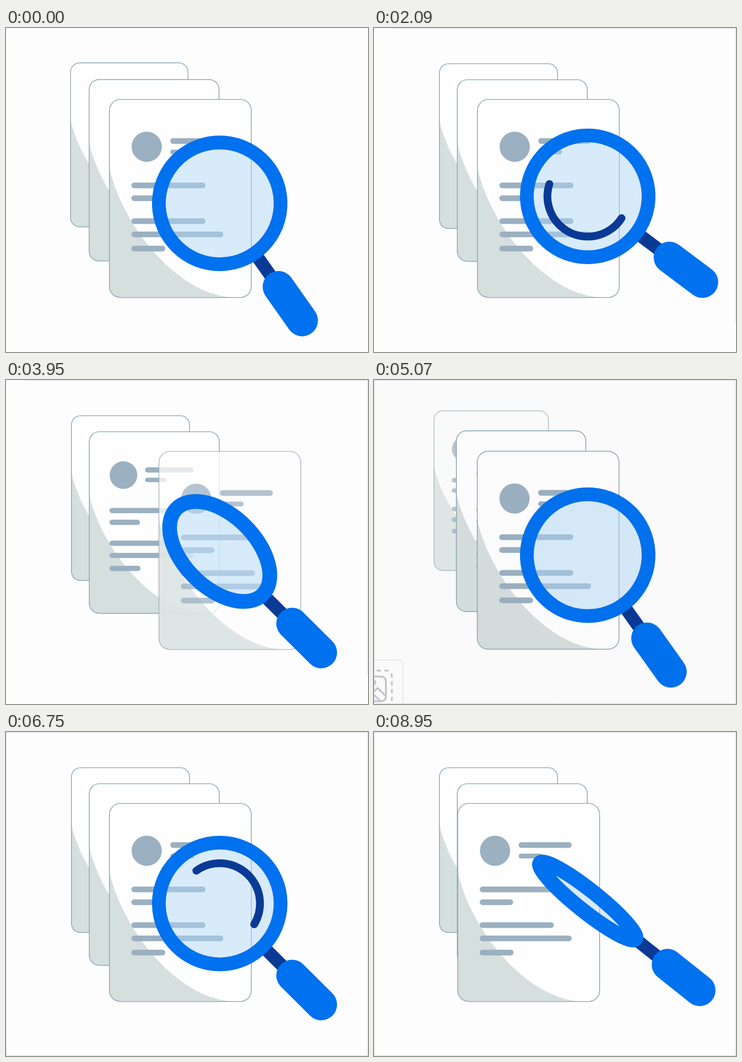
Animation, 791 px wide and 708 px high, one loop 9050 ms. Source, as an HTML page with a canvas:

```html
<!DOCTYPE html>
<html lang="en">
<head>
<meta charset="utf-8">
<title>Document search</title>
<style>
html, body { margin: 0; width: 100%; height: 100%; overflow: hidden; background: #fdfdfd; }
canvas { display: block; }
</style>
</head>
<body>
<canvas id="stage" width="791" height="708"></canvas>
<script>
const ctx = document.getElementById('stage').getContext('2d');
const W = 791, H = 708, LOOP = 9050, CYCLE = 119;
const BLUE = '#0071ef', NAVY = '#0a3a95', GREY = '#9bb0c0', EDGE = '#8ba4b4', PALE = '#d5dfde';
const RAD = Math.PI / 180;

// card slots from front to back: x, y, scale
const SLOTS = [[226, 156, 1], [182, 113, 0.9165], [143, 78, 0.832], [104, 43, 0.7475]];
// text bars on a card: left, right, middle, height
const BARS = [
  [133, 249, 91, 12.5], [133, 185, 115, 10.5], [48, 210, 188, 12.5], [48, 121, 216, 12.5],
  [48, 210, 266, 12.5], [48, 249, 295, 12.5], [48, 122, 326, 12.5]
];
const SLIDE_START = 58, SLIDE_END = 93.8, SHIFT_START = 86, STAGGER = 9, SHIFT_TIME = 35;

const clamp = (v, lo = 0, hi = 1) => Math.min(hi, Math.max(lo, v));
const mix = (a, b, u) => a + (b - a) * u;
const inBack = u => u * u * (2.70158 * u - 1.70158);

// playback holds every third step longer: 100, 20, 20 ms
function stepAt(t) {
  if (t < 20) return 0;
  if (t < 30) return 1;
  const k = Math.floor((t - 30) / 140), r = (t - 30) % 140;
  return Math.min(192, 2 + 3 * k + (r < 100 ? 0 : r < 120 ? 1 : 2));
}

function roundBox(x, y, w, h, r) {
  ctx.beginPath();
  ctx.roundRect(x, y, w, h, r);
}

function line(x1, y1, x2, y2, width, color, cap = 'butt') {
  ctx.lineWidth = width;
  ctx.strokeStyle = color;
  ctx.lineCap = cap;
  ctx.beginPath();
  ctx.moveTo(x1, y1);
  ctx.lineTo(x2, y2);
  ctx.stroke();
}

function card(slot, dx, alpha) {
  if (alpha <= 0) return;
  const a = Math.min(2, Math.floor(slot)), u = slot - a;
  const [x, y, s] = SLOTS[a].map((v, n) => mix(v, SLOTS[a + 1][n], u));
  ctx.save();
  ctx.globalAlpha = alpha;
  ctx.translate(x + dx, y);
  ctx.scale(s, s);
  roundBox(0, 0, 310, 433, 24);
  ctx.fillStyle = '#fefefe';
  ctx.fill();

  ctx.save();
  ctx.clip();
  ctx.fillStyle = PALE;
  ctx.beginPath();
  ctx.moveTo(0, 150);
  ctx.bezierCurveTo(25, 265, 140, 425, 270, 433);
  ctx.lineTo(0, 433);
  ctx.fill();
  ctx.restore();

  ctx.fillStyle = GREY;
  ctx.beginPath();
  ctx.arc(81.5, 103.5, 33, 0, 7);
  ctx.fill();
  for (const [l, r, m, h] of BARS) {
    roundBox(l, m - h / 2, r - l, h, h / 2);
    ctx.fill();
  }
  roundBox(0, 0, 310, 433, 24);
  ctx.lineWidth = 1.7 / s;
  ctx.strokeStyle = EDGE;
  ctx.stroke();
  ctx.restore();
}

function cards(i) {
  const shifting = i >= SHIFT_START;
  const rest = k => {
    const d = (shifting ? i : i + CYCLE) - SHIFT_START - k * STAGGER;
    if (d <= 0) return 1;
    return d >= SHIFT_TIME ? 0 : 2 ** (-10 * d / SHIFT_TIME);
  };
  card(2 + rest(2), 0, 1 - rest(2));
  card(1 + rest(1), 0, 1);
  if (shifting) card(rest(0), 0, 1);
  if (i < SLIDE_END) {
    const f = inBack(clamp((i - SLIDE_START) / (SLIDE_END - SLIDE_START)));
    card(0, 430 * f, clamp(1 - f));
  }
}

function magnifier(i) {
  const swing = 10 * Math.cos(2 * Math.PI * (i - 116) / CYCLE);
  const angle = (45 + swing) * RAD;
  const open = clamp(Math.abs(i - 75.9) / 17, 0.005, 1);
  ctx.save();
  ctx.translate(467, 374.8 + 0.846 * swing);
  ctx.rotate(angle);

  line(136, 0, 225, 0, 28, NAVY);
  line(223, 0, 313, 0, 69, BLUE, 'round');

  // the rim looks a little thicker as the lens turns edge-on
  ctx.beginPath();
  ctx.ellipse(0, 0, 133, 133 * open, 0, 0, 2 * Math.PI);
  ctx.fillStyle = 'rgba(174,213,247,0.48)';
  ctx.fill();
  ctx.lineWidth = 30 + 3.5 * Math.sqrt(1 - open);
  ctx.strokeStyle = BLUE;
  ctx.stroke();

  // glint running round the lens, growing and then shrinking
  const d = i - 26;
  const span = 152 + 0.684 * d - 0.23 * d * (d - 19);
  if (span > 0) {
    const mid = (304.9 + 8.97 * d + 0.057 * d * (d - 19)) * RAD - angle;
    const half = span / 2 * RAD;
    ctx.beginPath();
    ctx.ellipse(0, 0, 88, 88 * open, 0, mid - half, mid + half);
    ctx.lineWidth = 17;
    ctx.lineCap = 'round';
    ctx.strokeStyle = NAVY;
    ctx.stroke();
  }
  ctx.restore();
}

function frameLines(n) {
  if (n < 43) return;
  const tone = '#d3d3dc', full = n >= 106;
  line(full ? 0 : 43, 0.5, W, 0.5, 1, tone);
  line(W - 0.5, 0, W - 0.5, full ? H : 645, 1, tone);
  if (full) {
    line(0.5, 0, 0.5, H, 1, tone);
    line(0, H - 0.5, W, H - 0.5, 1, tone);
  }
}

// picture panel that shows briefly in the lower left corner
function panel(n) {
  const a = clamp(Math.min((n - 105) / 3, (117 - n) / 6));
  if (!a) return;
  ctx.save();
  ctx.globalAlpha = a;
  ctx.fillStyle = 'rgba(0,0,0,0.012)';
  ctx.fillRect(0, 0, W, H);
  roundBox(-40, 612, 103, 130, 10);
  ctx.fillStyle = '#fafafa';
  ctx.fill();
  ctx.lineWidth = 3;
  ctx.strokeStyle = '#ececef';
  ctx.stroke();
  ctx.strokeStyle = '#c3c3d2';
  ctx.lineWidth = 4;
  ctx.lineCap = 'butt';
  ctx.setLineDash([9, 8]);
  roundBox(-40, 635, 79, 90, 12);
  ctx.stroke();
  ctx.setLineDash([]);
  roundBox(-28, 648, 54, 54, 10);
  ctx.stroke();
  ctx.beginPath();
  ctx.moveTo(-8, 688);
  ctx.lineTo(8, 673);
  ctx.lineTo(26, 691);
  ctx.moveTo(-4, 684);
  ctx.lineTo(14, 702);
  ctx.stroke();
  ctx.beginPath();
  ctx.arc(-2, 661, 5, 0, 7);
  ctx.stroke();
  ctx.restore();
}

function draw(now) {
  const n = stepAt(now % LOOP), i = n % CYCLE;
  ctx.fillStyle = '#fdfdfd';
  ctx.fillRect(0, 0, W, H);
  cards(i);
  magnifier(i);
  panel(n);
  frameLines(n);
}

const start = performance.now();
function tick() {
  draw(performance.now() - start);
  requestAnimationFrame(tick);
}
tick();
</script>
</body>
</html>
```
